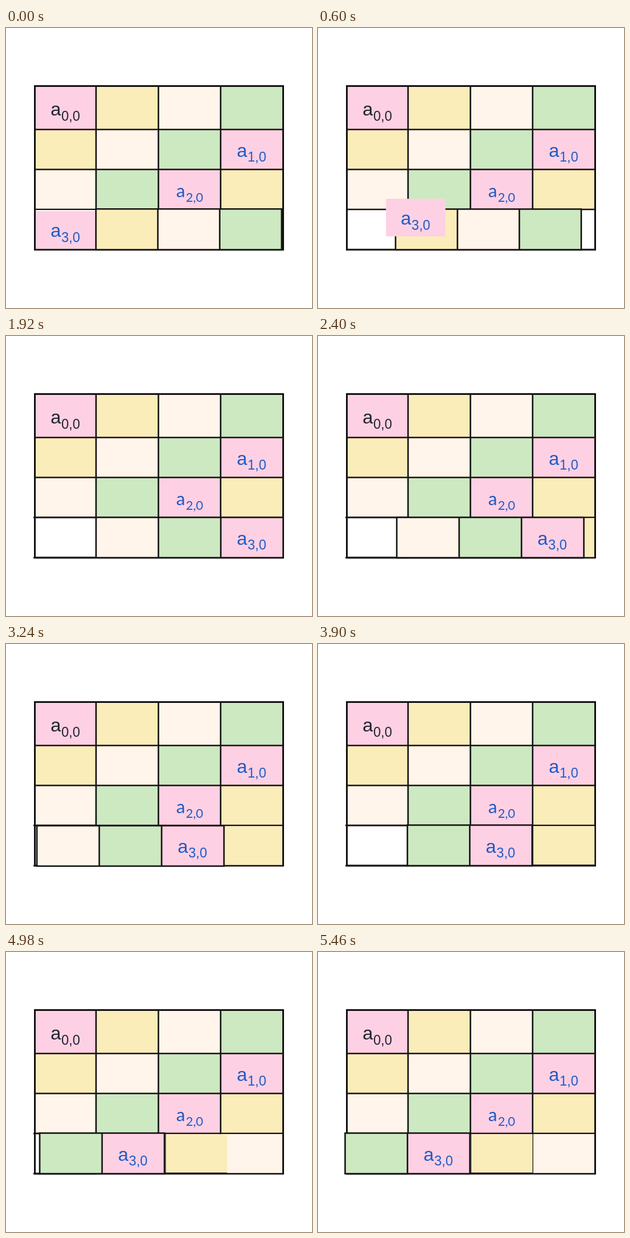
Animation of 525x480 px, one loop 5.52 s. Source, as an HTML page with a canvas:

```html
<!DOCTYPE html>
<html lang="en">
<head>
<meta charset="utf-8">
<title>Row rotation</title>
<style>
html, body { margin: 0; width: 100%; height: 100%; overflow: hidden; background: #fff; }
canvas { display: block; }
</style>
</head>
<body>
<canvas id="stage" width="525" height="480"></canvas>
<script>
const ctx = document.getElementById('stage').getContext('2d');
const LOOP = 5520, MOVE = 1490;
const PINK = '#fed0e4', YELLOW = '#faedb9', CREAM = '#fff5ea', GREEN = '#cce9c1';
const INK = '#161314', BLUE = '#1f5bc4';
const SANS = '"Liberation Sans", Arial, sans-serif';
const LATO = 'Lato, sans-serif';
const colX = [49.5, 154.5, 261.5, 368.2, 475.5];
const rowY = [99.5, 174, 242.5, 311, 380];
const rows = [
  [PINK, YELLOW, CREAM, GREEN],
  [YELLOW, CREAM, GREEN, PINK],
  [CREAM, GREEN, PINK, YELLOW]
];

// Eased progress of a slide that begins at the given time
function progress(t, start) {
  const u = Math.min(1, Math.max(0, (t - start) / MOVE));
  return (1 - Math.cos(Math.PI * u)) / 2;
}

function fill(color, x0, y0, x1, y1) {
  ctx.fillStyle = color;
  ctx.fillRect(x0, y0, x1 - x0, y1 - y0);
}

function line(x0, y0, x1, y1, width = 2.6) {
  ctx.strokeStyle = INK;
  ctx.lineWidth = width;
  ctx.beginPath();
  ctx.moveTo(x0, y0);
  ctx.lineTo(x1, y1);
  ctx.stroke();
}

function label(index, x, y, color, font = SANS, big = 32, small = 23, gap = 18.5) {
  ctx.fillStyle = color;
  ctx.font = `${big}px ${font}`;
  ctx.fillText('a', x, y);
  ctx.font = `${small}px ${font}`;
  ctx.fillText(index + ',0', x + gap, y + 8.5);
}

function table() {
  fill('#fff', 0, 0, 525, 480);
  rows.forEach((row, r) => row.forEach((color, c) =>
    fill(color, colX[c], rowY[r], colX[c + 1], rowY[r + 1])));
  for (let c = 1; c < 4; c++) line(colX[c], rowY[0], colX[c], rowY[3]);
  for (let r = 1; r < 4; r++) line(colX[0], rowY[r], colX[4], rowY[r]);
  ctx.strokeStyle = INK;
  ctx.lineWidth = 3;
  ctx.strokeRect(colX[0], rowY[0], colX[4] - colX[0], rowY[4] - rowY[0]);
  label(0, 76.5, 150, '#24242c');
  label(1, 396, 220.5, BLUE);
  label(2, 292, 289.5, BLUE, LATO, 31, 21.5, 16.5);
}

// Joined cells with an outline around each one
function strip(colors, x, width, top, bottom) {
  const end = x + width * colors.length;
  colors.forEach((color, i) => fill(color, x + width * i, top, x + width * (i + 1), bottom));
  for (let i = 0; i <= colors.length; i++) line(x + width * i, top, x + width * i, bottom);
  line(x - 1.3, top, end + 1.3, top);
  line(x - 1.3, bottom, end + 1.3, bottom);
}

function rowTails() {
  line(47, rowY[3], colX[1], rowY[3]);
  line(47, rowY[4], colX[1], rowY[4]);
}

// The first cell hops over the others to the end of the row
function hop(t) {
  const p = progress(t, 155);
  strip([YELLOW, CREAM, GREEN], 154.3 - 104 * p, 106.2, 310.3 + 0.7 * p, 380);
  const x = 51 + 321 * p, y = 313.7 - 35 * Math.sin(Math.PI * p);
  if (p === 0) fill('#fff', 51, 312, 153, 314);
  fill(PINK, x, y, x + 102, y + 64.5);
  label(3, x + 25.5, y + 44.5, BLUE);
}

// Three cells slide left and uncover the last one
function slideThree(t) {
  const p = progress(t, 1985);
  const x = 154.5 - 108 * p, drop = 0.8 * p;
  fill(YELLOW, colX[3], 312.3, 474, 378.7);
  rowTails();
  strip([CREAM, GREEN, PINK], x, 107, 311 + drop * 0.5, 380 + drop);
  label(3, x + 241.5, 357.5, BLUE);
}

function slideTwo(t) {
  const p = progress(t, 3803);
  const x = 154.5 - 108 * p, y = 370 - 107.5 * p;
  fill(CREAM, colX[3], 312.3, 474, 378.7);
  line(colX[3], 311, colX[3], 380, 2.2);
  rowTails();
  fill(YELLOW, y, 312.3, y + 105.5, 378.5);
  line(y, 311.5, y, 379, 1);
  line(y, 378.7, y + 105.5, 378.7, 1);
  strip([GREEN, PINK], x, 107, 310.5, 380);
  label(3, x + 134.5, 357.5, BLUE);
}

function draw(now) {
  const t = now % LOOP;
  table();
  if (t < 1800) hop(t);
  else if (t < 3660) slideThree(t);
  else slideTwo(t);
}

let begin;
function tick(now) {
  if (begin === undefined) begin = now;
  draw(now - begin);
  requestAnimationFrame(tick);
}
draw(0);
requestAnimationFrame(tick);
</script>
</body>
</html>
```
